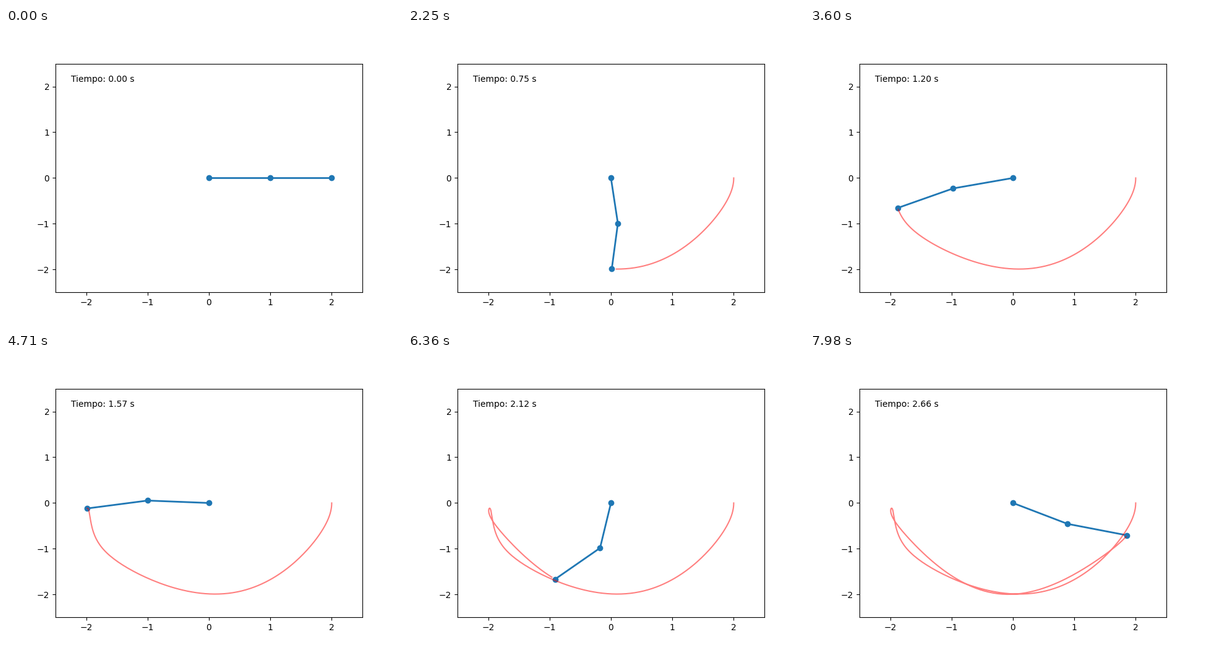
A matplotlib script that plays this animation: 640 by 480 pixels, repeating every 8 s.

```python
import numpy as np
import matplotlib.pyplot as plt
from matplotlib.animation import FuncAnimation

G, L1, L2, M1, M2 = 9.81, 1.0, 1.0, 1.0, 1.0
DT, SUBSTEPS = 0.01, 5
FRAMES, LOOP_MS = 267, 8000


def derivatives(state):
    a1, w1, a2, w2 = state
    d = a1 - a2
    s, c = np.sin(d), np.cos(d)
    den = M1 + M2 * s * s
    acc1 = (-M2 * s * (L1 * w1**2 * c + L2 * w2**2)
            - G * ((M1 + M2) * np.sin(a1) - M2 * np.sin(a2) * c)) / (L1 * den)
    acc2 = (s * ((M1 + M2) * L1 * w1**2 + M2 * L2 * w2**2 * c)
            + (M1 + M2) * G * (np.sin(a1) * c - np.sin(a2))) / (L2 * den)
    return np.array([w1, acc1, w2, acc2])


def rk4(state, h):
    k1 = derivatives(state)
    k2 = derivatives(state + h / 2 * k1)
    k3 = derivatives(state + h / 2 * k2)
    k4 = derivatives(state + h * k3)
    return state + h / 6 * (k1 + 2 * k2 + 2 * k3 + k4)


def simulate():
    state = np.array([np.pi / 2, 0, np.pi / 2, 0])
    states = [state]
    for _ in range(FRAMES - 1):
        for _ in range(SUBSTEPS):
            state = rk4(state, DT / SUBSTEPS)
        states.append(state)
    return np.array(states)


angles = simulate()
x1, y1 = L1 * np.sin(angles[:, 0]), -L1 * np.cos(angles[:, 0])
x2, y2 = x1 + L2 * np.sin(angles[:, 2]), y1 - L2 * np.cos(angles[:, 2])

fig, ax = plt.subplots(figsize=(6.4, 4.8), dpi=100)
ax.set_xlim(-2.5, 2.5)
ax.set_ylim(-2.5, 2.5)
rods, = ax.plot([], [], "o-", lw=2)
trail, = ax.plot([], [], "r-", alpha=0.5)
clock = ax.text(0.05, 0.92, "", transform=ax.transAxes)


def update(i):
    rods.set_data([0, x1[i], x2[i]], [0, y1[i], y2[i]])
    trail.set_data(x2[:i], y2[:i])
    clock.set_text(f"Tiempo: {i * DT:.2f} s")
    return rods, trail, clock


anim = FuncAnimation(fig, update, frames=FRAMES, interval=LOOP_MS / FRAMES,
                     repeat=True, repeat_delay=0)
plt.show()
```
